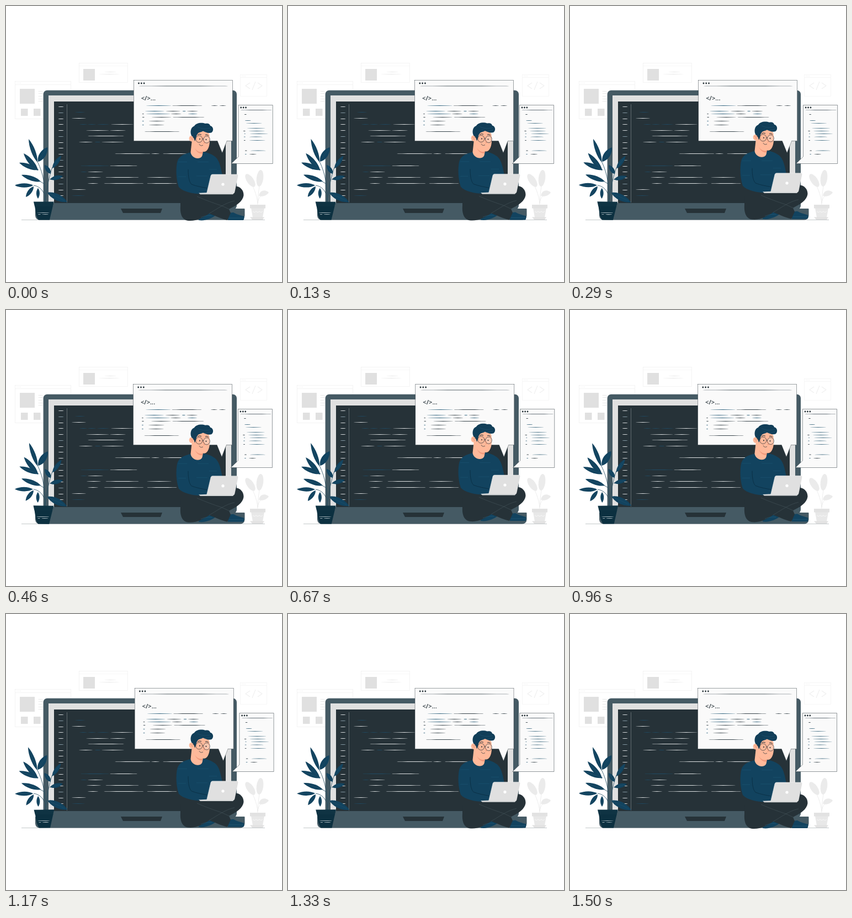
Animation, 500 px wide and 500 px high, one loop 1.54 s. Source, as an HTML page with a canvas:

```html
<!DOCTYPE html>
<html lang="en">
<head>
<meta charset="utf-8">
<title>Developer at work</title>
<style>
html, body { margin: 0; width: 100%; height: 100%; overflow: hidden; background: #fff; }
canvas { display: block; width: 500px; height: 500px; }
</style>
</head>
<body>
<canvas id="stage" width="500" height="500"></canvas>
<script>
const ctx = document.getElementById('stage').getContext('2d');
const LOOP = 1540, CYCLE = 1500, LEAD = 20;
const DARK = '#263238', SLATE = '#455a64', BLUE = '#12435f', PALE = '#e0e0e0', FAINT = '#efefef', SKIN = '#ffb99a';
const SHAKE = [0, -2, 1.4, -2, 2.4, -2.8, 2.4, -2, 1.8, -1.6, 0];

function rect(x, y, w, h, fill, stroke, width = 0.7) {
  if (fill) { ctx.fillStyle = fill; ctx.fillRect(x, y, w, h); }
  if (stroke) { ctx.strokeStyle = stroke; ctx.lineWidth = width; ctx.strokeRect(x, y, w, h); }
}

function rounded(x, y, w, h, r, fill) {
  ctx.beginPath();
  ctx.roundRect(x, y, w, h, r);
  ctx.fillStyle = fill;
  ctx.fill();
}

function path(d, fill, stroke, width = 0.7) {
  const p = new Path2D(d);
  if (fill) { ctx.fillStyle = fill; ctx.fill(p); }
  if (stroke) { ctx.strokeStyle = stroke; ctx.lineWidth = width; ctx.stroke(p); }
}

function oval(x, y, rx, ry, turn, fill, stroke, width = 0.8) {
  ctx.beginPath();
  ctx.ellipse(x, y, rx, ry, turn, 0, 7);
  if (fill) { ctx.fillStyle = fill; ctx.fill(); }
  if (stroke) { ctx.strokeStyle = stroke; ctx.lineWidth = width; ctx.stroke(); }
}

// Each row is "y: from-to from-to ..."; a trailing b selects the accent colour.
// The strokes are very flat ovals, so they thin out towards both ends.
function rows(list, color, accent) {
  for (const row of list.split(';')) {
    const [y, spans] = row.split(':');
    for (const span of spans.trim().split(' ')) {
      const [a, b] = span.split('-').map(parseFloat);
      oval((a + b) / 2, +y, (b - a) / 2, 0.52, 0, span.endsWith('b') ? accent : color);
    }
  }
}

function dots(x, y, step) {
  for (let i = 0; i < 3; i++) oval(x + i * step, y, 1.4, 1.4, 0, DARK);
}

function drawPanels() {
  rect(16.5, 136.5, 101, 68, '#fff', FAINT);
  path('M16.5 142.5H117.5', null, FAINT);
  rect(25, 150, 27, 27, PALE);
  rect(27, 186, 12.5, 13, PALE);
  rect(50, 186, 12.5, 13, PALE);
  rows('154.5:58-67;158.5:58-68;163.5:58-66;168.5:58-68;172.5:58-67', '#e6e6e6');
  rect(132.5, 103.5, 88, 35, '#fff', FAINT);
  path('M132.5 108.5H220.5', null, '#f4f4f4');
  rect(140, 114, 21, 21, PALE);
  rows('119.5:178-200;123.5:168-206', '#e6e6e6');
  rect(424.5, 124.5, 48, 39, '#fff', '#f3f3f3');
  path('M424.5 129.5H472.5', null, '#f3f3f3');
  path('M442 139L434 144.5L442 150M456 139L464 144.5L456 150M452 137L446 152', null, FAINT, 1.1);
  for (const x of [20, 23, 26]) oval(x, 139.5, 0.7, 0.7, 0, FAINT);
  for (const x of [428, 430.5, 433]) oval(x, 127, 0.7, 0.7, 0, FAINT);
}

function drawPalePlant() {
  path('M456 360C455 340 447 329 443 316M456 358C456 340 460 325 461 309M456 358C457 346 463 342 470 339', null, '#ebebeb', 0.9);
  oval(442.5, 316, 6.2, 13.5, -0.6, '#ebebeb');
  oval(460, 312, 6.2, 15, 0.12, '#ebebeb');
  path('M458 344C460 333 470 332 476 338C472 344 464 346 458 344Z', '#ebebeb');
  path('M444 366H468L465 383H447Z', '#e8e8e8');
  rect(442, 360, 28, 6.5, '#e2e2e2');
  path('M442 382.5H468L465 387H446Z', '#e2e2e2');
  path('M447 372l3 2l3-2l3 2l3-2l3 2l3-2', null, '#fafafa', 0.8);
}

function drawBigLaptop() {
  rounded(67.6, 152.7, 350.4, 216, 7, SLATE);
  rect(77, 162, 331, 195, PALE);
  rect(87, 173, 311, 184, DARK);
  rounded(53, 367, 379.5, 20.5, [1, 1, 8, 8], SLATE);
  path('M208 367H283L280 375H212Z', DARK);
  path('M110.5 178V356', null, '#8d979b', 0.6);
  for (let i = 0; i < 16; i++) {
    oval(99.6, ((182.5 + i * 10.75) | 0) + 0.5, 4.8, 0.55, 0, i % 4 === 1 ? '#8ba0ab' : '#e4e7e8');
  }
  rows('192.5:125-143b;203.5:119-145;214.5:133-147b 148-163b 165-187b 190-231;225.5:145-187 188-217;' +
    '235.5:148-214;246.5:132-157 161-171b 173-214;267.5:197-262 263-278 284-332;' +
    '289.5:135-187b 188-238;300.5:135-147b 148-176;310.5:146-172 180-241 255-300;' +
    '321.5:148-167 177-250 255-310;332.5:119-145;343.5:119-143b', '#dfe3e4', '#1f4a62');
}

function drawWindows() {
  rect(231.6, 134.5, 179, 110, '#fafafa', DARK, 0.45);
  path('M383 243.5L392 266L400.5 243.5Z', '#fafafa');
  path('M383 244.5L392 266L400.5 244.5', null, DARK, 0.35);
  dots(240.8, 140, 4.8);
  rows('145:240-403', '#566268');
  ctx.fillStyle = DARK;
  ctx.font = '600 11.2px "Open Sans", sans-serif';
  ctx.fillText('</>...', 245, 170.5);
  rows('180.5:254-300b 301-356 372-384 387-399;190.5:252-287b 290-316 320-326b 328-348;' +
    '195.5:247-250 254-298b 299-318 330-347b;201.5:247-251 264-300 302-360;' +
    '208.5:247-250b 259-288;215.5:247-250b 259-287;227.5:251-315', '#37434a', '#2f627d');

  path('M421.3 179.5H483.5V285.5H408.3L421.3 273Z', '#fafafa', DARK, 0.5);
  dots(426, 184, 4.4);
  rows('188.5:425-482', '#66727a');
  rows('196.5:432-436;207.5:433-444b;212.5:435-464b;221.5:437-470b;226.5:430-434 440-469b;' +
    '231.5:432-434b 442-475b;237:431-434b 441-465b;243.5:431-434 441-470b;' +
    '262:433-437 443-471b;268.5:433-436b 441-454', '#37434a', '#4d7589');
}

function leaf(x1, y1, x2, y2, fat) {
  const len = Math.hypot(x2 - x1, y2 - y1);
  ctx.save();
  ctx.translate(x1, y1);
  ctx.rotate(Math.atan2(y2 - y1, x2 - x1));
  path(`M0 0C${len * 0.25} ${-fat} ${len * 0.7} ${-fat} ${len} 0C${len * 0.7} ${fat} ${len * 0.25} ${fat} 0 0Z`, BLUE);
  path(`M0 0H${len * 0.85}`, null, '#2f5e78', 0.3);
  ctx.restore();
}

function drawPlant(angle) {
  ctx.save();
  ctx.translate(63, 314);
  ctx.rotate(angle);
  ctx.translate(-63, -314);
  path('M71 356C72 330 68 304 57 282M71 356C74 330 78 308 84 292M69 322L62 318M69 340C65 331 58 326 50 325M75 340L80 338M79 314L84 312', null, '#244c60', 0.8);
  leaf(57, 283, 41, 241, 5);
  leaf(58, 282, 75, 256, 7.5);
  leaf(58, 298, 32, 267, 5.8);
  leaf(59, 297, 24, 284, 5.5);
  leaf(63, 318, 28, 306, 5.5);
  leaf(49, 325, 16, 325, 5);
  leaf(50, 327, 36, 346, 4.8);
  leaf(58, 330, 58, 349, 4);
  leaf(84, 294, 100, 271, 5);
  leaf(81, 304, 70, 288, 5);
  leaf(80, 314, 103, 308, 5);
  leaf(75, 338, 111, 355, 7.5);
  path('M52 362H85L79 387.5H59Q55 382 54 374Z', '#0c3040');
  path('M50 354.5H87L84.5 363H52Z', '#0f3343');
  rows('374.5:56-79;377.5:58-63 65-77', '#a9b8be');
  ctx.restore();
}

function drawLegs() {
  path('M349 388C349 382 355 376 364 374L380 379C374 384 364 388 354 388.5Z', BLUE);
  path('M402 375L412 374C418 378 426 379 431 381C432 384 431 387 430 388H402Z', BLUE);
  path('M321 334C340 329 360 338 375 338L408 328C421 323 431 332 430.5 343C429 354 418 361 404 368' +
    'L407 375L401 388C388 385 377 379 368 376C358 383 345 390 331 389C319 388 315 377 316 362C316 350 317 342 321 334Z', DARK);
  path('M346 345C362 352 376 357 391 362M368 376C382 368 398 356 414 353M391 362L404 368', null, '#4a5a61', 0.5);
  path('M353 383C360 380 366 379 373 380M404 384H430', null, '#2d617d', 0.5);
}

function drawTorso() {
  path('M335 265C321 268 311 273 309.5 286C307 304 310 319 313 328C323 339 350 343 375 339L392 306C389 295 388 281 379 273C371 267 361 264 353 264Z', BLUE);
  path('M330 296C330 310 332 319 336 323C346 327 355 328 364 330', null, '#0a2c40', 0.8);
  path('M312 282.5H328M347 282.5H367M312 309H326M345 308H365M368 296H382', null, '#1e5877', 0.5);
}

function drawHead() {
  path('M337 242L334.5 265C336 274 345 278 352 275C356 273 357 268 356 258Z', SKIN);
  path('M342 257C345 263 351 266 357 264L356 267.5C349 268 344 263 342 257Z', '#f19a7d');
  path('M339 232C344 222 366 223 368.5 233C370 245 369 257 363 262.5C356 267 344 261 340 250Z', SKIN);
  oval(336, 240.3, 4.3, 5.3, -0.2, SKIN);
  path('M334 238C336 239 338 241 337 243', null, '#c66a52', 0.6);
  path('M336.5 235.5C333 230 334 220 341 217.5C344 211.5 355 210.5 361 213C367 212 369.5 214.5 370 217C376.5 218.5 376.5 227 372 229.5' +
    'C366 231 361 228.5 357 226.5C353 229 350 228.5 348 230.5C345 233 344.5 240 342 245C341 241 340 237 336.5 235.5Z', '#113e58');
  path('M347 219C355 223 363 223 370 221M351 225C358 228 366 227 371 225', null, '#2b617e', 0.4);
  oval(349.8, 241, 6, 6.2, 0, null, DARK, 0.7);
  oval(363.5, 242, 5.8, 6.2, 0, 'rgba(255,255,255,.2)', DARK, 0.7);
  path('M355.7 241Q356.8 239.7 358 241.3M343.8 240L338 238', null, DARK, 0.7);
  oval(351, 241, 0.9, 1.2, 0, DARK);
  oval(362.5, 242, 0.9, 1.2, 0, DARK);
  path('M347 233.5Q350 231 354 233M361 233.5Q364 232 367 235', null, DARK, 1);
  path('M357 243C359 246 361 248 358 249', null, '#cc6b50', 0.7);
  path('M350 250C351 253 354 254 357 252', null, DARK, 0.7);
}

function drawSmallLaptop() {
  path('M349 338.8L365 338H414L411 341.3H352Z', '#d3d6d7');
  path('M374 305H418Q421 305 420.3 308L414.5 336.5Q414 339.5 411 339.5H363.5L371 307.5Q371.6 305 374 305Z', PALE);
  path('M363.5 339.5L371 307.5Q371.6 305 374 305H418', null, '#f0f0f0', 0.5);
  oval(393, 323, 2.6, 2.6, 0, '#fff');
}

function drawPerson(lift) {
  ctx.save();
  ctx.translate(0, -lift);
  drawLegs();
  drawTorso();
  drawHead();
  drawSmallLaptop();
  ctx.restore();
}

function shakeAt(p) {
  const i = Math.min(9, Math.floor(p * 10));
  return SHAKE[i] + (SHAKE[i + 1] - SHAKE[i]) * (p * 10 - i);
}

// Linear sway: +1 at a quarter, -1 at three quarters.
const swayAt = p => p < 0.25 ? p * 4 : p < 0.75 ? 2 - p * 4 : p * 4 - 4;

function draw(now) {
  const p = Math.min(1, (now % LOOP + LEAD) / CYCLE);
  ctx.fillStyle = '#fff';
  ctx.fillRect(0, 0, 500, 500);
  drawPanels();
  path('M28 387.5H469', null, '#9aa3a7', 0.6);
  drawPalePlant();
  drawBigLaptop();
  ctx.save();
  ctx.translate(shakeAt(p), 0);
  drawWindows();
  ctx.restore();
  drawPlant(swayAt(p) * Math.PI / 180);
  drawPerson(3 * (1 - Math.cos(2 * Math.PI * p)));
}

const start = performance.now();
function tick() {
  draw(performance.now() - start);
  requestAnimationFrame(tick);
}
tick();
</script>
</body>
</html>
```
